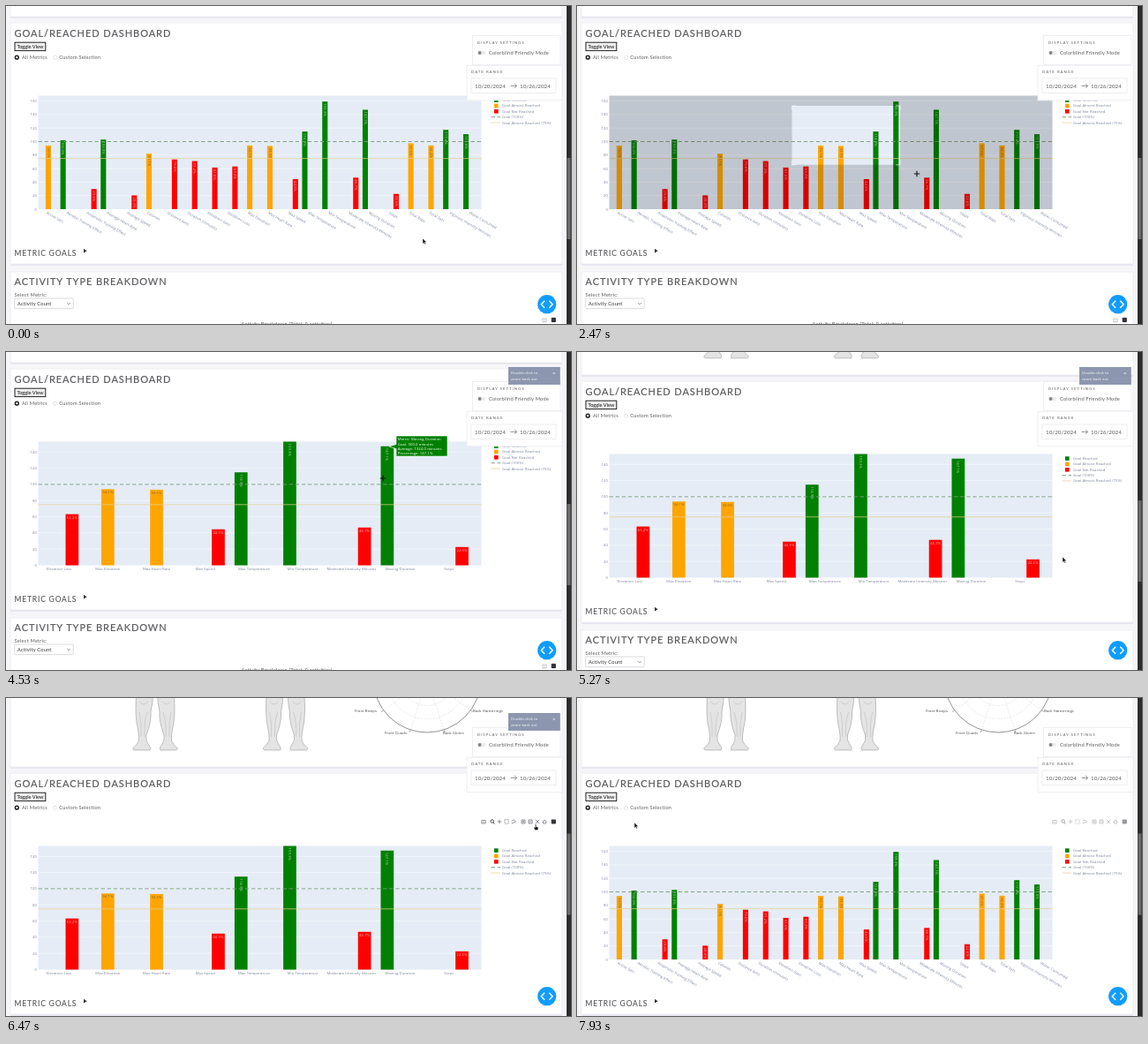
An HTML page that plays this animation: 640 by 360 pixels, repeating every 8 s.

```html
<!DOCTYPE html>
<html lang="en">
<head>
<meta charset="utf-8">
<title>Goal dashboard</title>
<style>
html, body { margin: 0; width: 100%; height: 100%; overflow: hidden; background: #f6f6f9; }
svg { display: block; width: 100vw; height: 100vh; }
text { font-family: Lato, sans-serif; fill: #5c5c60; white-space: pre; }
.h1 { font-size: 11px; letter-spacing: .95px; stroke: #5c5c60; stroke-width: .2; }
.h2 { font-size: 8.5px; letter-spacing: .82px; stroke: #5c5c60; stroke-width: .15; }
.ui { font-size: 5.7px; letter-spacing: .2px; }
.cap { font-size: 4.4px; letter-spacing: .95px; }
.date { font-size: 6.3px; }
.tiny { font-family: "Open Sans", sans-serif; font-size: 4.2px; letter-spacing: .08px; fill: #78839a; }
.tip { fill: #fff; }
.card { fill: #fff; stroke: #ebebf0; stroke-width: .8; }
.icon { fill: none; stroke: #85858c; stroke-width: .9; }
</style>
</head>
<body>
<svg id="stage" viewBox="0 0 640 360" xmlns="http://www.w3.org/2000/svg"></svg>
<script>
const LOOP = 8000, LEFT = 36.5, WIDTH = 502, TOP = 101.5;
const DRAG = { x: 243.5, y: 113, right: 451, start: 2300, end: 3450 };
const RESET = 6800;
const COLORS = { g: '#008000', o: '#ffa500', r: '#ff0000' };
const SLOT = { g: -1, o: 0, r: 1 };

// name | status | percent of goal
const METRICS = `Active Sets|o|94.0
Aerobic Training Effect|g|102.0
Anaerobic Training Effect|r|29.8
Average Heart Rate|g|103.0
Average Speed|r|20.4
Calories|o|82.1
Distance (km)|r|73.6
Duration (minutes)|r|71.2
Elevation Gain|r|61.6
Elevation Loss|r|63.2
Max Elevation|o|94.1
Max Heart Rate|o|93.5
Max Speed|r|44.5
Max Temperature|g|114.9
Min Temperature|g|159.3
Moderate Intensity Minutes|r|46.7
Moving Duration|g|147.1
Steps|r|22.6
Total Reps|o|97.5
Total Sets|o|94.4
Vigorous Intensity Minutes|g|117.4
Water Consumed|g|111.0`.split('\n').map(row => {
  const [name, kind, value] = row.split('|');
  return { name, kind, value: +value };
});

const text = (x, y, cls, str, extra = '') => `<text x="${x}" y="${y}" class="${cls}" ${extra}>${str}</text>`;
const rect = (x, y, w, h, extra = '') => `<rect x="${x}" y="${y}" width="${w}" height="${h}" ${extra}/>`;
const line = (x1, y1, x2, y2, extra) => `<line x1="${x1}" y1="${y1}" x2="${x2}" y2="${y2}" ${extra}/>`;
const GOAL = 'stroke="#759a7c" stroke-width=".9" stroke-dasharray="4.5 2.6"';
const ALMOST = 'stroke="#e6cf90" stroke-width=".7"';

// Shows the categories between the fractional positions `from` and `to`.
function chart(id, from, to, bottom, max, slanted) {
  const yOf = v => bottom - v * (bottom - TOP) / max;
  const step = WIDTH / (to - from), bw = step * .8 / 3;
  const right = LEFT + WIDTH;
  let s = rect(LEFT, TOP, WIDTH, bottom - TOP, 'fill="#e5ecf6"');
  for (let v = 0; v < max; v += 20) {
    const y = yOf(v);
    if (v) s += line(LEFT, y, right, y, 'stroke="#fff" stroke-width=".7" opacity=".7"');
    s += text(35, y + 1.5, 'tiny', v, 'text-anchor="end"');
  }
  METRICS.forEach(({ name, kind, value }, i) => {
    if (i + .5 < from || i + .5 > to) return;
    const mid = LEFT + step * (i + .5 - from), cx = mid + SLOT[kind] * bw;
    const y = Math.max(TOP, yOf(value));
    if (cx < right) {
      s += rect(cx - bw / 2, y, bw, bottom - y, `fill="${COLORS[kind]}"`);
      const flat = !slanted && kind !== 'g';
      const ink = kind === 'o' ? 'style="fill:#444;opacity:.7"' : 'style="fill:#fff;opacity:.7"';
      s += flat
        ? text(cx, y + 5, 'tiny', value.toFixed(1) + '%', `text-anchor="middle" ${ink}`)
        : text(0, 0, 'tiny', value.toFixed(1) + '%', `transform="translate(${cx - 1.4} ${y + 2}) rotate(90)" ${ink}`);
    }
    s += slanted
      ? text(0, 0, 'tiny', name, `transform="translate(${mid - 2.5} ${bottom + 5}) rotate(30)"`)
      : text(mid, bottom + 5.2, 'tiny', name, 'text-anchor="middle"');
  });
  s += line(LEFT, yOf(100), right, yOf(100), GOAL) + line(LEFT, yOf(75), right, yOf(75), ALMOST);
  return `<g id="${id}">${s}</g>`;
}

function charts() {
  const at = x => (x - LEFT) * METRICS.length / WIDTH;
  return chart('full', 0, METRICS.length, 230, 168, true)
    + chart('zoomed', at(DRAG.x), at(DRAG.right), 241.5, 152.8, false);
}

function legend() {
  const names = ['Goal Reached', 'Goal Almost Reached', 'Goal Not Reached', 'Goal (100%)', 'Goal Almost Reached (75%)'];
  return names.map((n, i) => {
    const y = 106.6 + i * 6.35;
    const mark = i < 3
      ? rect(553, y - 2.3, 4.6, 4.6, `fill="${COLORS['gor'[i]]}"`)
      : line(549.5, y, 560, y, i === 3 ? GOAL : ALMOST);
    return mark + text(562, y + 1.5, 'tiny', n);
  }).join('');
}

function legs(axis) {
  const d = 'M-21 -75 Q-23 -52 -21 -38 Q-18 -25 -18.5 -18 Q-20 -13 -25 -9.5 Q-26 -7 -22 -7 L-6 -7 Q-4 -9 -8 -14 Q-11 -18 -10 -24 Q-4 -40 -5 -50 Q-2 -62 -3 -75Z';
  const one = `<path d="${d}"/><path d="M-18 -62 Q-13 -56 -8 -62 M-18 -50 Q-15 -38 -16 -22 M-9 -50 Q-13 -38 -12 -22" fill="none" opacity=".5"/>`;
  return `<g transform="translate(${axis} 0)" fill="#e4e4e4" stroke="#9a9a9c" stroke-width=".6">${one}<g transform="scale(-1 1)">${one}</g></g>`;
}

function radar() {
  const cx = 477, cy = -88, r = 61;
  const faint = 'stroke="#dcdce4" stroke-width=".6" stroke-dasharray="2 1.5"';
  let s = `<circle cx="${cx}" cy="${cy}" r="${r}" fill="#fff" stroke="#77777c" stroke-width=".8"/>`;
  for (const k of [.25, .5, .75])
    s += `<circle cx="${cx}" cy="${cy}" r="${r * k}" fill="none" ${faint}/>`;
  for (let i = 0; i < 10; i++) {
    const a = (18 + 36 * i) * Math.PI / 180, x = Math.sin(a), y = Math.cos(a);
    s += line(cx, cy, cx + x * r, cy + y * r, faint);
    s += line(cx + x * r, cy + y * r, cx + x * (r + 3), cy + y * (r + 3), 'stroke="#77777c" stroke-width=".7"');
  }
  const label = (x, y, str, end) => text(x, y, 'tiny', str, `style="fill:#444" text-anchor="${end ? 'end' : 'start'}"`);
  return s + label(420, -50, 'Front Biceps', 1) + label(529, -50, 'Back Hamstrings')
    + label(454, -25.5, 'Front Quads', 1) + label(495, -25.5, 'Back Glutes');
}

function modebar() {
  const shapes = [
    [541, 'M-2.2 -1.5H2.2V2H-2.2Z M-.8 .3H.8'],
    [551, 'M-2 -.5A1.7 1.7 0 1 1 1.4 -.5A1.7 1.7 0 1 1 -2 -.5 M1 1L2.5 2.5'],
    [559, 'M-2.4 0H2.4 M0 -2.4V2.4'],
    [567, 'M-2.2 -2.2H2.2V2.2H-2.2Z'],
    [575, 'M-2.4 -.3Q0 -3.4 2.4 -.3Q1 2 -1 1L-1.8 2.5'],
    [586, 'M-2 -2H2V2H-2Z M-1.2 0H1.2 M0 -1.2V1.2'],
    [594, 'M-2 -2H2V2H-2Z M-1.2 0H1.2'],
    [602, 'M-2.2 -2.2L2.2 2.2 M2.2 -2.2L-2.2 2.2'],
    [610, 'M-2.4 .2L0 -2L2.4 .2 M-1.6 0V2H1.6V0']
  ];
  return `<g id="modebar">${shapes.map(([x, d], i) =>
    `<path class="icon" transform="translate(${x} 74)" d="${d}" ${i === 1 ? 'style="stroke:#333"' : i === 3 ? 'stroke-dasharray="1 .8"' : ''}/>`).join('')}
    ${rect(617.7, 71.4, 5.2, 5.2, 'rx=".8" fill="#33333c"')}</g>`;
}

const band = (y, h) => rect(5, y, 625, h, 'fill="#e6e6ee"');
const page = `
  ${band(10, 4)}${rect(5, -200, 625, 212, 'class="card"')}
  ${band(290, 4)}${rect(5, 19, 625, 273, 'class="card"')}
  ${rect(5, 301, 625, 200, 'class="card"')}
  ${legs(169)}${legs(316.5)}${radar()}
  ${text(9.5, 35, 'h1', 'GOAL/REACHED DASHBOARD')}
  ${rect(10, 41.2, 34.8, 9.4, 'fill="#efefef" stroke="#222" stroke-width="1"')}
  ${text(27.5, 48, 'ui', 'Toggle View', 'text-anchor="middle" style="letter-spacing:0;fill:#111"')}
  <circle cx="12.3" cy="58.2" r="1.9" fill="#fff" stroke="#222" stroke-width="1.5"/>
  <circle cx="55.5" cy="58.2" r="2.1" fill="#fff" stroke="#dcdce0" stroke-width=".7"/>
  ${text(18, 60.2, 'ui', 'All Metrics')}${text(60.3, 60.2, 'ui', 'Custom Selection')}
  ${charts()}${legend()}${modebar()}
  <g id="select">
    <path id="dim" fill="#000" fill-rule="evenodd"/>
    <path id="corners" fill="none" stroke="#fff" stroke-width="1.4"/>
  </g>
  <g id="tip">
    <path d="M434 107L442 104.5V95H500V118H442V109.5Z" fill="#008000" stroke="#fff" stroke-width=".6"/>
    ${['Metric: Moving Duration', 'Goal: 900.0 minutes', 'Average: 1324.0 minutes', 'Percentage: 147.1%']
      .map((s, i) => text(443.8, 100.2 + i * 5.4, 'tiny tip', s)).join('')}
  </g>
  ${text(9.5, 282.6, 'h2', 'METRIC GOALS')}
  <path d="M88 274.8L91.6 277.2L88 279.6Z" fill="#333"/>
  ${text(9.5, 316.2, 'h1', 'ACTIVITY TYPE BREAKDOWN')}
  ${text(9.5, 328.8, 'ui', 'Select Metric:')}
  ${rect(9.7, 331, 66.5, 11.6, 'rx="1" fill="#fff" stroke="#d2d2d8" stroke-width=".8"')}
  ${text(13, 339, 'ui', 'Activity Count', 'style="fill:#333"')}
  <path d="M69.2 336L71 337.8L72.8 336" class="icon"/>
  ${text(318, 362, 'ui', 'Activity Breakdown (Total: 9 activities)', 'text-anchor="middle"')}
  <path class="icon" transform="translate(610 355.5)" d="M-2.2 -1.5H2.2V2H-2.2Z M-.8 .3H.8" opacity=".5"/>
  ${rect(617.7, 352.8, 5.2, 5.2, 'rx=".8" fill="#33333c"')}`;

const fixed = `
  ${rect(528.5, 33.5, 99.5, 33, 'class="card"')}
  ${text(533.8, 42.7, 'cap', 'DISPLAY SETTINGS')}
  ${rect(534, 50.7, 9.5, 4.6, 'rx="2.3" fill="#ededf0"')}
  <circle cx="536.6" cy="53" r="1.9" fill="#85858a"/>
  ${text(547, 55, 'ui', 'Colorblind Friendly Mode')}
  ${rect(522, 67.2, 108, 39.6, 'class="card"')}
  ${text(527, 76.2, 'cap', 'DATE RANGE')}
  ${rect(527, 82, 96, 16.4, 'fill="#fff" stroke="#e6e6ea" stroke-width=".7"')}
  ${text(531, 92.5, 'date', '10/20/2024')}${text(582, 92.5, 'date', '10/26/2024')}
  <path d="M571.5 90.4H578.6M576.2 88L578.6 90.4L576.2 92.8" class="icon"/>
  <g id="toast">
    ${rect(569, 17, 58.8, 20, 'fill="#8c97af"')}
    ${text(572, 25, 'tiny tip', 'Double-click to')}${text(572, 31.5, 'tiny tip', 'zoom back out')}
    ${text(619, 25.5, 'tiny tip', '×', 'style="font-size:6px"')}
  </g>
  ${rect(635, 0, 5, 360, 'fill="#2c2c2c"')}
  <rect id="thumb" x="635.6" width="3.8" height="92" fill="#6b6b6b"/>
  <circle cx="612.7" cy="337.7" r="10.6" fill="#119dff"/>
  <path d="M610.1 333.7L606.3 337.7L610.1 341.7M615.3 333.7L619.1 337.7L615.3 341.7" fill="none" stroke="#fff" stroke-width="1.4"/>
  <g id="cursor">
    <path id="arrow" d="M0 0V6.2L1.5 4.9L2.5 7L3.5 6.5L2.5 4.5H4.4Z" fill="#111" stroke="#fff" stroke-width=".4"/>
    <path id="cross" d="M-3.2 0H3.2M0 -3.2V3.2" stroke="#111" stroke-width="1.1"/>
    <path id="hand" d="M-.6 -3V.8L-1.8 .2L-2.2 1L-.6 3.6H2.4L3 .8Q2.6 -.2 .6 -.2V-3Q0 -3.7 -.6 -3Z" fill="#111" stroke="#fff" stroke-width=".4"/>
  </g>`;

document.getElementById('stage').innerHTML =
  `<rect width="640" height="360" fill="#f6f6f9"/><g id="page">${page}</g>${fixed}`;

const el = id => document.getElementById(id);
const set = (id, name, value) => el(id).setAttribute(name, value);
const show = (id, on) => { el(id).style.display = on ? '' : 'none'; };
const ramp = (t, a, b) => Math.min(1, Math.max(0, (t - a) / (b - a)));
const ease = p => p * p * (3 - 2 * p);

// time, x, y of the pointer
const PATH = [
  [0, 472, 263], [900, 472, 263], [1350, 330, 165], [1480, 330, 165], [2150, DRAG.x, DRAG.y], [DRAG.start, DRAG.x, DRAG.y],
  [2470, 385, 190], [3150, DRAG.right, 240], [3550, DRAG.right, 240], [4320, 427, 143], [4540, 427, 143],
  [5150, 550, 232], [5650, 550, 232], [6400, 600, 146], [6900, 600, 146], [7800, 65, 141], [LOOP, 65, 141]
];
function pointer(t) {
  const i = Math.max(1, PATH.findIndex(p => p[0] >= t));
  const [t0, x0, y0] = PATH[i - 1], [t1, x1, y1] = PATH[i];
  const p = ease(ramp(t, t0, t1));
  return [x0 + (x1 - x0) * p, y0 + (y1 - y0) * p];
}

function drawSelection(t) {
  const on = t >= DRAG.start && t < DRAG.end;
  show('select', on);
  if (!on) return;
  const { x, y, start } = DRAG;
  const [px, py] = pointer(Math.max(start, t - 40));
  const r = Math.max(x + 1, px), b = Math.min(230, Math.max(y + 1, py));
  const fade = ramp(t, start + 90, start + 290);
  const k = Math.min(5, (r - x) / 3, (b - y) / 3);
  set('dim', 'd', `M${LEFT} ${TOP}h${WIDTH}V230H${LEFT}ZM${x} ${y}H${r}V${b}H${x}Z`);
  set('dim', 'opacity', .4 * fade);
  set('corners', 'opacity', fade);
  set('corners', 'd', `M${x} ${y + k}V${y}H${x + k}M${r - k} ${y}H${r}V${y + k}M${r} ${b - k}V${b}H${r - k}M${x + k} ${b}H${x}V${b - k}`);
}

function draw(t) {
  const zoomed = t >= DRAG.end && t < RESET;
  const scroll = 66 * ramp(t, 5180, 5610);
  const [x, y] = pointer(t);
  set('page', 'transform', `translate(0 ${scroll})`);
  set('thumb', 'y', 172 - scroll * .28);
  show('full', !zoomed);
  show('zoomed', zoomed);
  show('tip', t >= 4270 && t < 4620);
  // 0.7 s in, 3 s hold, 0.7 s out
  const age = t - DRAG.end;
  set('toast', 'opacity', ramp(age, 0, 700) * (1 - ramp(age, 3700, 4400)));
  set('modebar', 'opacity', 1 - .5 * ramp(t, 6950, 7250));
  drawSelection(t);

  const bottom = (zoomed ? 241.5 : 230) + scroll;
  const inPlot = x > LEFT && x < LEFT + WIDTH && y > TOP + scroll && y < bottom;
  const cross = inPlot || (t > DRAG.start && t < 3550);
  const hand = t > 6300 && t < 6960;
  set('cursor', 'transform', `translate(${x} ${y})`);
  show('cross', cross && !hand);
  show('hand', hand);
  show('arrow', !cross && !hand);
}

function frame() {
  draw(performance.now() % LOOP);
  requestAnimationFrame(frame);
}
frame();
</script>
</body>
</html>
```
